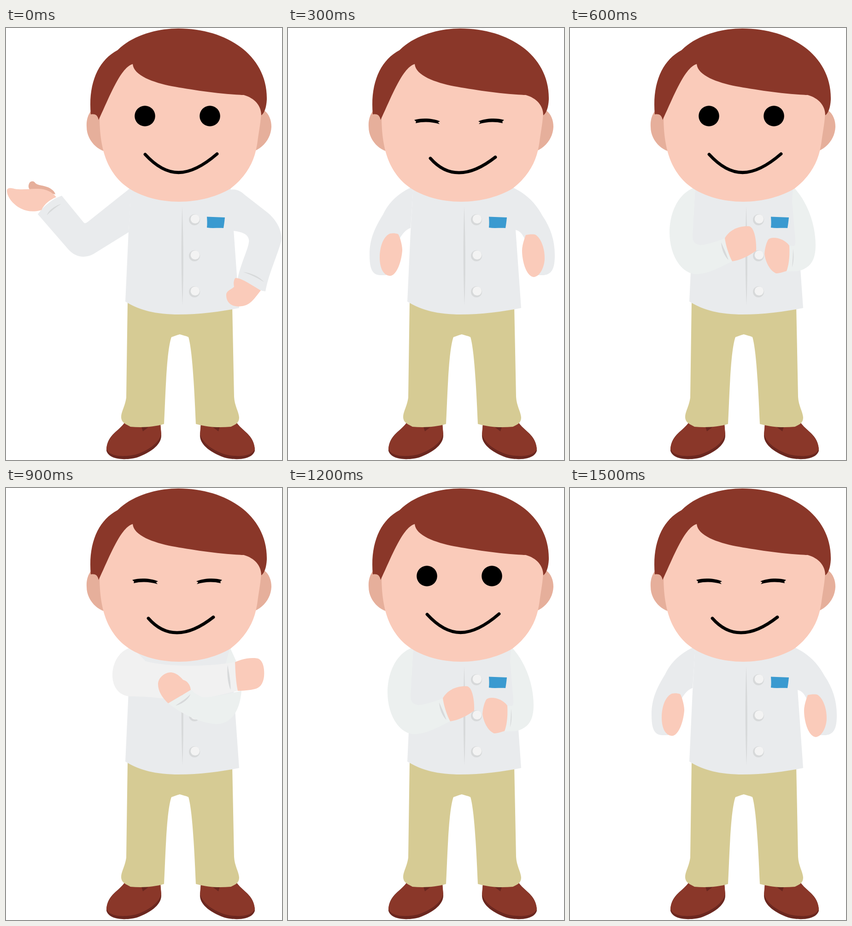
Recreate the animation shown at these times as an HTML page. Size 599 by 935 pixels, loop 1.8 s.

```html
<!DOCTYPE html>
<html lang="en">
<head>
<meta charset="utf-8">
<title>Gesturing man</title>
<style>
  html, body { margin: 0; width: 100%; height: 100%; overflow: hidden; background: #fff; }
  svg { display: block; width: 100%; height: 100%; }
  .skin { fill: #facbba; }
  .shade { fill: #e6af9b; }
  .brown { fill: #8a3729; }
  .sole { fill: #6b271f; }
  .coat { fill: #e9ebed; }
  .sleeve { fill: #ecf0ef; }
  .pale { fill: #f1f1f1; }
  .crease { fill: #d7d9da; }
  .smile { fill: none; stroke: #000; stroke-width: 6.8; stroke-linecap: round; }
</style>
</head>
<body>
<svg viewBox="0 0 599 935">
  <defs>
    <g id="shoe">
      <path class="sole" d="M259 852C246 873 218 880 218 915C224 936 264 936 286 929C310 920 337 904 337 882L335 858Z"/>
      <path class="brown" d="M259 852C246 873 221 880 218 911C225 930 262 928 282 923C307 915 331 900 337 879L335 855Z"/>
      <path class="sole" d="M294 863L297 873L309 864Z"/>
    </g>
    <g id="button">
      <circle class="crease" r="12"/>
      <circle cx="1.5" cy="-1.8" r="9.8" fill="#f3f3f3"/>
    </g>
    <path id="lid" d="M274 199C290 194.500 313 195 330 202L325.500 204L329 208C312 203 295 202 277 206L278 202.500Z"/>
  </defs>

  <use href="#shoe"/>
  <use href="#shoe" transform="matrix(-1 0 0 1 758 0)"/>
  <path fill="#d6cb94" d="M264 590L261 800C258 820 250 830 250 842C250 855 262 858 270 863C295 865 320 864 343 857C346 800 348 700 359 669C368 666 373 664 377 663C383 665 390 666 396 669C405 700 409 790 412 857C440 865 465 865 488 863C498 858 506 855 506 843C505 830 496 818 495 798L491 600Z"/>
  <path class="coat" d="M272 340L266 440L259 592C290 611 325 620 375 620C420 620 465 614 506 606L494 437L487 340Z"/>
  <path class="crease" d="M382.500 386C385 450 386 530 383 600C380 530 380 450 382.500 386Z"/>
  <use href="#button" x="409" y="415"/>
  <use href="#button" x="409" y="493"/>
  <use href="#button" x="409" y="571"/>
  <path fill="#3a9ad0" d="M436 408.500L475 410C474 420 473 427 472 433C460 432 448 434 436 432C437 424 436.500 416 436 408.500Z"/>

  <g data-pose="present">
    <path class="coat" d="M272 345Q268 347 264 351L182 416C172 424 171 424 167 419L121 363C102 369 83 384 69 403L136 480C150 495 170 500 190 489L266 442Z"/>
    <path class="crease" d="M89 405C97 397 108 388 120 380.500C106 385 92 395 89 405Z"/>
    <path class="shade" d="M52 350C48 346 48 340 51 335C55 330 61 331 64 336C69 341 80 340 92 345C100 349 106 354 107 360Z"/>
    <path class="skin" d="M2 353C2 345 10 346 18 348C35 351 50 348 65 348C86 347 101 355 109 366C95 372 84 380 77 394C60 399 45 397 33 391C18 384 3 368 2 353Z"/>
    <path class="coat" d="M485 350C500 348 508 352 518 361L567 399C587 415 601 440 597 462C588 496 571 528 563 570C542 567 520 556 503 541C509 510 530 470 527 458C525 445 510 441 493 439Z"/>
    <path class="crease" d="M514 528C532 530 550 538 560 550C548 542 532 534 514 528Z"/>
    <path class="skin" d="M498 541C512 541 532 556 553 568C540 584 531 600 512 602C495 605 478 598 478 578C478 568 490 566 495 560C493 552 495 543 498 541Z"/>
  </g>

  <g data-pose="rest">
    <path class="coat" d="M272 343C240 356 218 378 206 404C190 430 177 455 177 490C177 520 182 534 200 535L213 535L244 453C250 443 258 435 266 433Z"/>
    <path class="skin" d="M221 445C206 452 199 475 199 496C199 520 207 536 222 536.500C238 534 247 500 248 481C248 470 243 452 239 446C233 444 227 444 221 445Z"/>
    <path class="coat" d="M485 344C515 357 537 378 552 406C570 432 579 460 579 492C579 520 573 533 555 535L543 535L513 455C508 445 502 438 493 437Z"/>
    <path class="skin" d="M516 448C511 462 508 472 508 482C508 505 517 537 533 539C548 538 557 515 557 498C557 475 548 453 536 447C528 446 522 447 516 448Z"/>
  </g>

  <g data-pose="clasp">
    <path class="sleeve" d="M272 345C235 356 216 400 216 442C216 490 240 532 275 533C305 531 330 515 352 505L336 455C315 464 290 470 282 470C270 467 266 462 266 450Z"/>
    <path class="crease" d="M328 464C329 480 336 495 344 502C338 485 333 475 328 464Z"/>
    <path class="skin" d="M336 455C345 438 365 428 388 429C400 430 405 460 404 482C390 492 370 503 352 505C344 490 338 470 336 455Z"/>
    <path class="sleeve" d="M484 343C515 375 533 425 533 470C533 505 520 520 495 526L470 527L476 471L485 472C492 472 488 450 487 435L482 375Z"/>
    <path class="crease" d="M484 478C486 490 486 505 482 518C483 505 484 490 484 478Z"/>
    <path class="skin" d="M431 457C440 450 465 455 476 471C477 490 476 510 470 526C460 529 453 531 447 531C433 525 424 505 422 489C423 475 427 462 431 457Z"/>
  </g>

  <g data-pose="cross">
    <path class="sleeve" d="M486 345L501 378L477 380Z"/>
    <path class="pale" d="M274 345C245 350 231 380 231 405C231 430 245 450 270 451C295 451 325 453 352 457L402 440L430 456L503 439L497 377C430 388 350 387 303 375L279 350Z"/>
    <path class="sleeve" d="M352 466L402 437C413 448 424 454 432 453C455 452 485 444 511 439C508 480 490 512 455 511C420 508 383 490 352 466Z"/>
    <path class="crease" d="M481 383C479 403 482 425 487.500 437C488 420 484 400 481 383ZM368 471C385 467 398 455 400 446C392 456 380 462 368 471Z"/>
    <path class="skin" d="M497 377C515 368 540 366 549 370C560 377 561 395 560 408C558 425 550 433 540 435C528 438 515 439 503 439C499 420 498 400 497 377Z"/>
    <path class="skin" d="M352 466C340 455 330 440 330 425C330 410 345 399 358 399C370 400 378 408 384 415C395 418 400 427 401 437C385 447 368 456 352 466Z"/>
  </g>

  <path class="shade" d="M184 180C178 188 174 200 175 214C175 238 192 260 214 267L220 180ZM561 179C571 186 576 200 576 214C575 238 560 257 540 266L540 180Z"/>
  <path class="skin" d="M203 190C203 260 218 300 246 330C275 360 325 376 376 376C420 376 460 364 488 347C525 318 541 285 546 245C549 222 553 205 554 180L548 140L276 74L220 110Z"/>
  <path class="brown" d="M184 187C178 120 200 70 242 48C275 15 330 1 374 1C480 1 568 60 566 155C565 172 561 184 554 189C554 168 540 152 516 145C460 143 400 133 360 126C320 118 277 103 275 78C248 86 225 148 201 199C199 189 194 185 184 187Z"/>

  <g data-face="open">
    <circle cx="301.5" cy="190.500" r="22.300"/>
    <circle cx="442.5" cy="190.500" r="22.300"/>
    <path class="smile" d="M302 273.500C350 326 396 326 458 272.500"/>
  </g>
  <g data-face="shut">
    <use href="#lid"/>
    <use href="#lid" transform="matrix(-1 0 0 1 743 0)"/>
    <path class="smile" d="M309 282C345 323 392 325 450 279.500"/>
  </g>
</svg>
<script>
  const STEP = 300;
  const poses = ['present', 'rest', 'clasp', 'cross', 'clasp', 'rest'];

  function show(attribute, value) {
    for (const part of document.querySelectorAll(`[data-${attribute}]`)) {
      part.style.display = part.dataset[attribute] === value ? '' : 'none';
    }
  }

  function draw(time) {
    const step = Math.floor(time / STEP) % poses.length;
    show('pose', poses[step]);
    show('face', step % 2 ? 'shut' : 'open');
  }

  const start = performance.now();
  function tick() {
    draw(performance.now() - start);
    requestAnimationFrame(tick);
  }
  tick();
</script>
</body>
</html>
```
